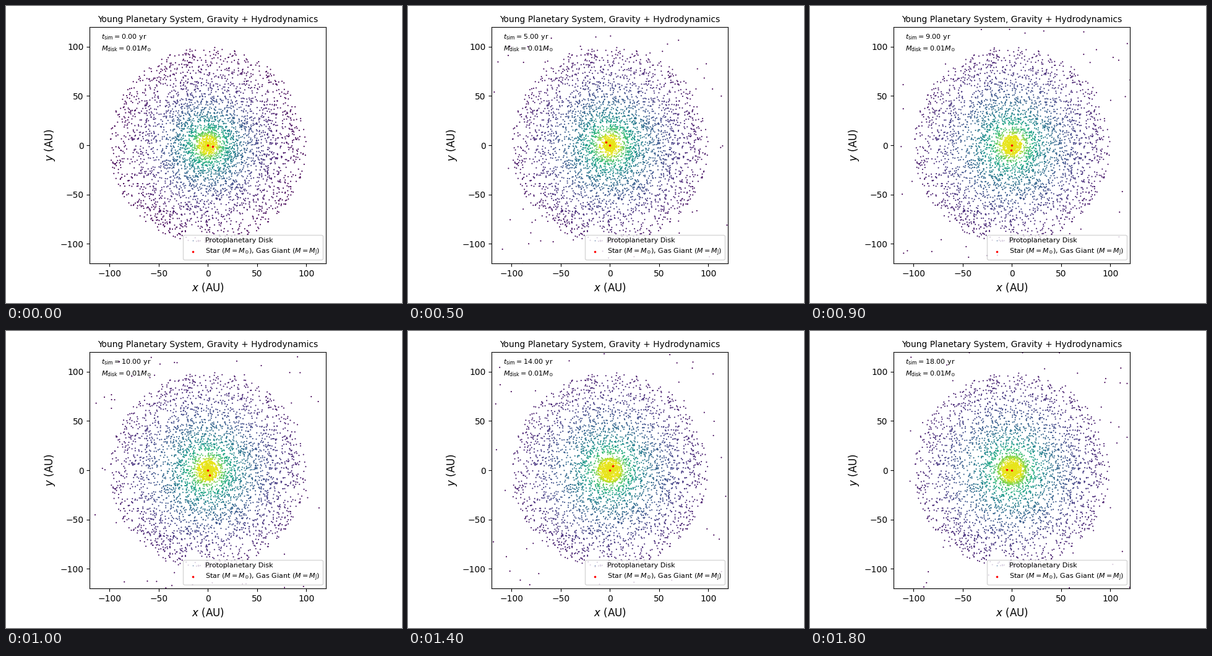
Animation of 640x480 px, one loop 1900 ms. Source, as a matplotlib script:

```python
import numpy as np
import matplotlib.pyplot as plt
from matplotlib.animation import FuncAnimation

W, H, DPI = 640, 480, 100
FRAMES, INTERVAL = 19, 100
N_DISK, N_EJECTA = 4200, 800
R_DISK, R_PLANET = 100, 5.2

rng = np.random.default_rng(7)
viridis = plt.get_cmap("viridis")

# surface density falls as 1/r, so the radius is spread evenly
disk_r = rng.uniform(0.5, R_DISK, N_DISK)
disk_angle = rng.uniform(0, 2 * np.pi, N_DISK)

# gas thrown out of the centre along straight lines
launch = rng.uniform(0, FRAMES, N_EJECTA)
speed = rng.uniform(20, 46, N_EJECTA)
heading = rng.uniform(0, 2 * np.pi, N_EJECTA)


def polar(r, angle):
    return np.column_stack([r * np.cos(angle), r * np.sin(angle)])


def free_fall(r, t):
    """Signed radius of gas dropped from rest that swings through the centre."""
    tau = t / (0.177 * r ** 1.5)
    swing = np.round(tau / 2)
    size = r * (1 - (tau - 2 * swing) ** 2) ** (2 / 3)
    return np.where(swing % 2 == 0, size, -size)


def gas(t):
    flight = speed * (t - launch)
    flight = np.where(flight > 0.5, flight, np.nan)
    r = np.concatenate([free_fall(disk_r, t), flight])
    angle = np.concatenate([disk_angle, heading])
    return polar(r, angle), np.maximum(np.abs(r), 0.1)


def density_colors(r, t):
    """Log density scaled to 0..1; the range widens as gas escapes."""
    grown = 1 - np.exp(-t / 6)
    outer, inner = 100 + 40 * grown, 8 + 1.5 * grown
    level = np.log(outer / r) / np.log(outer / inner)
    return viridis(np.clip(level, 0, 0.97) ** 1.25)


def planet(t):
    angle = np.radians(-11) + 2 * np.pi * t / R_PLANET ** 1.5
    return R_PLANET * np.cos(angle), R_PLANET * np.sin(angle)


fig = plt.figure(figsize=(W / DPI, H / DPI), dpi=DPI)
left, bottom, side = 135.3, 64.0, 381.9
ax = fig.add_axes([left / W, bottom / H, side / W, side / H])
ax.set(xlim=(-120, 120), ylim=(-120, 120))
ax.set_xticks(range(-100, 101, 50))
ax.set_yticks(range(-100, 101, 50))
ax.set_title("Young Planetary System, Gravity + Hydrodynamics", fontsize=10)
ax.set_xlabel("$x$ (AU)", fontsize=12)
ax.set_ylabel("$y$ (AU)", fontsize=12)

start_xy, start_r = gas(0)
dots = ax.scatter(*start_xy.T, s=2.3, c=density_colors(start_r, 0), linewidths=0)
disk_key = ax.scatter([], [], s=1, color=viridis(0.3), linewidths=0)
bodies = ax.scatter([0, R_PLANET], [0, 0], s=6.5, color="red", linewidths=0)
ax.legend(
    [disk_key, bodies],
    ["Protoplanetary Disk", r"Star ($M=M_{\odot}$), Gas Giant ($M=M_\mathrm{J}$)"],
    loc="lower right", fontsize=8,
)

clock = ax.text(0.05, 0.95, "", transform=ax.transAxes, fontsize=8)
ax.text(0.05, 0.90, r"$M_\mathrm{disk}=0.01M_{\odot}$",
        transform=ax.transAxes, fontsize=8)


def update(i):
    t = float(i)
    xy, r = gas(t)
    dots.set_offsets(xy)
    dots.set_facecolors(density_colors(r, t))
    bodies.set_offsets([(0, 0), planet(t)])
    clock.set_text(rf"$t_\mathrm{{sim}}={t:.2f}$ yr")
    return dots, bodies, clock


anim = FuncAnimation(fig, update, frames=FRAMES, interval=INTERVAL,
                     repeat=True, repeat_delay=0, blit=False)
plt.show()
```
